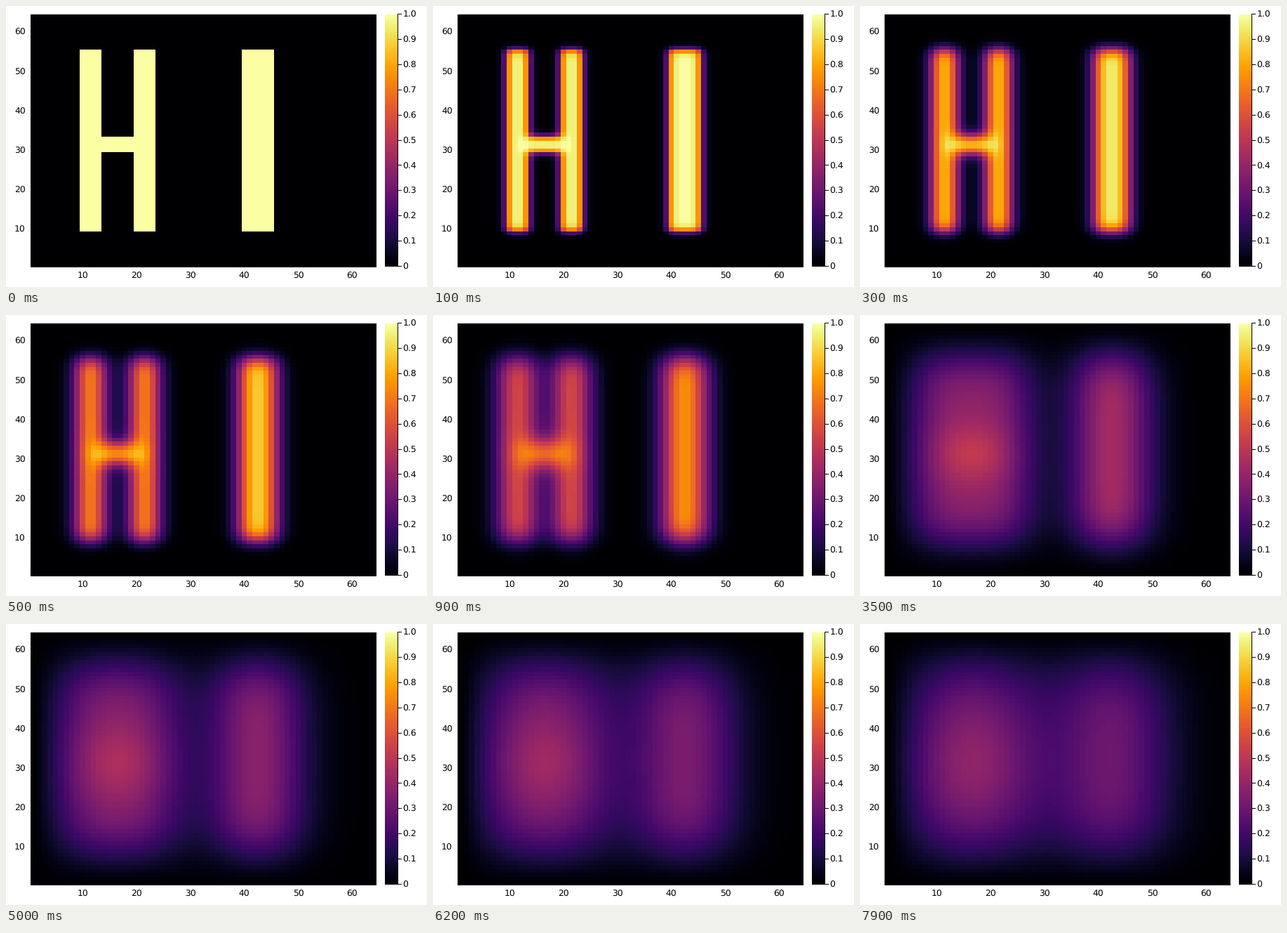
A matplotlib script that plays this animation: 600x400 px, repeating every 8000 ms.

```python
import numpy as np
import matplotlib.pyplot as plt
from matplotlib.animation import FuncAnimation

W, H, DPI = 600, 400, 100
N = 64                 # grid cells per side
FRAMES, STEP_MS = 80, 100
RATE = 0.385           # diffusivity * time per frame, in cells squared
LEFT, RIGHT, TOP, BOTTOM = 36, 528, 12, 371
BAR_L, BAR_R = 540, 558
FONT_PX = 12.4

plt.rcParams.update({"font.family": "DejaVu Sans", "text.hinting": "none"})


def letters():
    """Initial heat: the word HI, in 1-based inclusive cell ranges."""
    u = np.zeros((N, N))
    for x0, x1, y0, y1 in [(10, 13, 10, 55), (20, 23, 10, 55),
                           (10, 23, 30, 33), (40, 45, 10, 55)]:
        u[y0 - 1:y1, x0 - 1:x1] = 1
    return u


# Eigenmodes of the 1D Laplacian; the outermost cells are held at zero.
n = N - 2
lap = np.eye(n, k=1) + np.eye(n, k=-1) - 2 * np.eye(n)
lam, modes = np.linalg.eigh(lap)
start = letters()


def heat(i):
    spread = (modes * np.exp(lam * RATE * i)) @ modes.T
    u = np.zeros((N, N))
    u[1:-1, 1:-1] = spread @ start[1:-1, 1:-1] @ spread.T
    return u


fig = plt.figure(figsize=(W / DPI, H / DPI), dpi=DPI, facecolor="white")
ax = fig.add_axes([0, 0, 1, 1])
ax.axis("off")


def picture(data, x0, x1):
    return ax.imshow(data, cmap="inferno", vmin=0, vmax=1, origin="lower",
                     extent=(x0, x1, BOTTOM, TOP), aspect="auto",
                     interpolation="nearest")


def line(x0, y0, x1, y1):
    ax.plot([x0, x1], [y0, y1], color="black", lw=72 / DPI,
            solid_capstyle="butt", snap=False)


def label(x, y, text, ha):
    ax.text(x, y + 4, text, ha=ha, va="baseline", fontsize=FONT_PX * 72 / DPI)


field = picture(start, LEFT, RIGHT)
picture(np.linspace(0, 1, 256)[:, None], BAR_L, BAR_R)

line(LEFT - 1, BOTTOM + 0.5, RIGHT, BOTTOM + 0.5)
line(LEFT - 0.5, TOP, LEFT - 0.5, BOTTOM + 1)
line(BAR_R + 0.5, TOP - 1, BAR_R + 0.5, BOTTOM)

for v in range(10, 61, 10):
    frac = (v - 0.5) / N
    label(LEFT + frac * (RIGHT - LEFT), 383.4, str(v), "center")
    label(27.8, BOTTOM - frac * (BOTTOM - TOP), str(v), "right")

for k in range(11):
    y = BOTTOM - k / 10 * (BOTTOM - TOP)
    line(BAR_R, round(y) - 0.5, BAR_R + 6, round(y) - 0.5)
    label(565.6, y, f"{k / 10:.1f}" if k else "0", "left")

ax.set_xlim(0, W)
ax.set_ylim(H, 0)


def update(i):
    field.set_data(heat(i))
    return [field]


anim = FuncAnimation(fig, update, frames=FRAMES, interval=STEP_MS,
                     repeat=True, repeat_delay=0, blit=False)
plt.show()
```
